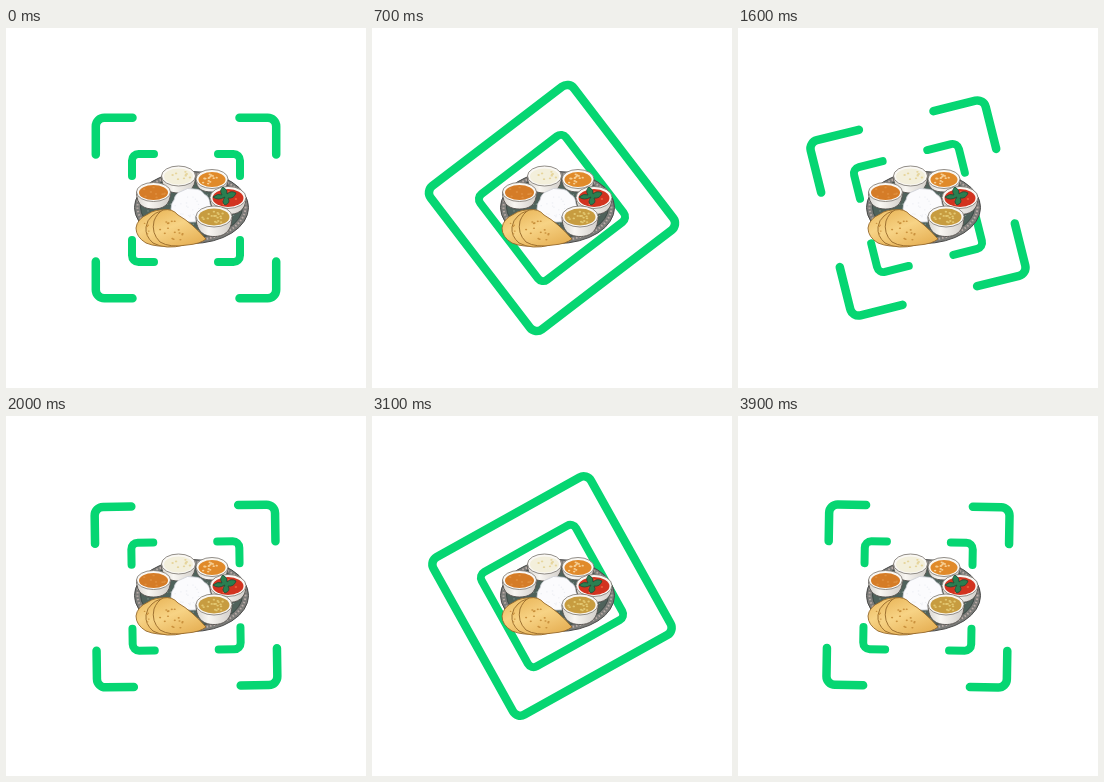
An HTML page for the animation above (4 s loop, 360x360 px).

```html
<!DOCTYPE html>
<html lang="en">
<head>
<meta charset="utf-8">
<title>Meal scan</title>
<style>
  html, body { margin: 0; width: 100%; height: 100%; overflow: hidden; background: #fff; }
  svg { display: block; width: 100vw; height: 100vh; }
</style>
</head>
<body>
<svg viewBox="0 0 360 360">
  <defs>
    <linearGradient id="crust" x1="0" y1="0" x2=".6" y2="1">
      <stop offset="0" stop-color="#e9b558"/>
      <stop offset=".5" stop-color="#f7d385"/>
      <stop offset="1" stop-color="#e8b45a"/>
    </linearGradient>
    <linearGradient id="china">
      <stop offset="0" stop-color="#d9d6d0"/>
      <stop offset=".35" stop-color="#f8f6f2"/>
      <stop offset="1" stop-color="#d2cec9"/>
    </linearGradient>
  </defs>
  <g id="frame" fill="none" stroke="#06d672" stroke-linecap="round" stroke-linejoin="round">
    <path id="outer" stroke-width="8.500"/>
    <path id="inner" stroke-width="8"/>
  </g>
  <g id="meal" stroke-linejoin="round">
    <ellipse cx="185.500" cy="179.500" rx="57" ry="36" fill="#7b7c79" stroke="#4a4a49"/>
    <ellipse cx="185.500" cy="179" rx="54" ry="33" fill="none" stroke="#b9aaa6" stroke-width="2" stroke-dasharray="1.500 2"/>
    <ellipse cx="185.500" cy="179" rx="51" ry="30.500" fill="#4f625b" stroke="#3e4a46"/>
    <g id="weave" fill="#82918a"></g>
    <g id="back"></g>
    <path d="M165 181Q165 175 168 172Q169 165 176 163Q181 159 188 161Q195 161 198 166Q204 169 204 176Q208 182 203 187Q196 195 184 194Q171 193 166 187Z" fill="#fbfbfd" stroke="#c9ccd2" stroke-width=".8"/>
    <g id="grain" fill="#eceef3"></g>
    <g id="front"></g>
    <g fill="url(#crust)" stroke="#96682a" stroke-width=".9">
      <path d="M142 186Q149 181 161 182L166 217Q152 220 140 215Q130 209 130 200Q131 191 142 186Z"/>
      <path d="M146 188Q153 181 163 184L178 217Q160 222 147 215Q139 208 140 199Q141 192 146 188Z"/>
      <path d="M157 182Q166 180 172 187Q186 195 200 211Q194 216 181 217Q164 220 154 214Q145 205 148 193Q151 185 157 182Z"/>
    </g>
    <g id="toast" fill="#c9903c"></g>
  </g>
</svg>
<script>
const LOOP = 4000, STEP = 100;
const el = id => document.getElementById(id);

// time, angle in degrees, slope in degrees per 100 ms
const KEYS = [
  [0, 0, 0], [700, 52.6, 13.2], [1200, 122, 13.6], [1940, 180, 0],
  [2000, 179.2, -2.6], [2500, 133.2, -12], [3100, 60.9, -11.5],
  [3600, 13.6, -6.3], [4000, 0, 0]
];

function angleAt(t) {
  const i = KEYS.findIndex(k => k[0] > t);
  const [t0, a, m] = KEYS[i - 1], [t1, b, n] = KEYS[i];
  const u = (t - t0) / (t1 - t0), h = (t1 - t0) / 100, v = 1 - u;
  return a * v * v * (1 + 2 * u) + b * u * u * (3 - 2 * u)
    + h * u * v * (m * v - n * u);
}

// Rounded square made of four corners; gap is half the opening of a side.
function corners(half, r, gap) {
  const e = half - r;
  return [[-1, -1], [1, -1], [1, 1], [-1, 1]].map(([x, y]) =>
    `M${x * half} ${y * gap}V${y * e}` +
    `A${r} ${r} 0 0 ${x * y > 0 ? 1 : 0} ${x * e} ${y * half}H${x * gap}`
  ).join("");
}

function seeded(n) {
  return () => (n = (n * 16807) % 2147483647) / 2147483647;
}

function dots(count, cx, cy, rx, ry, size, seed) {
  const rnd = seeded(seed);
  let s = "";
  for (let i = 0; i < count; i++) {
    const a = rnd() * Math.PI * 2, d = Math.sqrt(rnd());
    const x = cx + Math.cos(a) * d * rx, y = cy + Math.sin(a) * d * ry;
    s += `<ellipse cx="${x.toFixed(1)}" cy="${y.toFixed(1)}" rx="${size}" ry="${size * 0.75}"/>`;
  }
  return s;
}

function bowl(x, y, rx, ry, depth, fill, speck, count) {
  const w = rx - 2.5, h = ry - 2;
  return `<path d="M${x - rx} ${y}C${x - rx} ${y + depth * 0.8} ${x - 9} ${y + depth} ${x} ${y + depth}` +
    `S${x + rx} ${y + depth * 0.8} ${x + rx} ${y}Z" fill="url(#china)" stroke="#55514d" stroke-width=".9"/>` +
    `<ellipse cx="${x}" cy="${y}" rx="${rx}" ry="${ry}" fill="#faf8f4" stroke="#77716b" stroke-width=".8"/>` +
    `<ellipse cx="${x}" cy="${y + 0.5}" rx="${w}" ry="${h}" fill="${fill}"/>` +
    `<g fill="${speck}">${dots(count, x, y + 0.5, w - 2.5, h - 2, 1.2, Math.round(x * 7919))}</g>`;
}

el("weave").innerHTML = dots(150, 185.5, 179, 49, 29, 0.8, 6151);

el("back").innerHTML =
  bowl(172.5, 148, 17, 10, 17, "#f3efdb", "#e6d59c", 9) +
  bowl(206, 151, 16, 9.5, 13, "#e08a2a", "#f6cf94", 14) +
  bowl(147.5, 164, 17, 9.5, 17, "#d57c27", "#de8d3c", 9);

el("front").innerHTML =
  bowl(222, 169.5, 18, 11, 17, "#d2331f", "#e85f3c", 8) +
  `<path d="M219 169Q212 173 207 169Q212 165 216 167Q213 162 217 159Q222 162 221 166Q225 162 230 165Q228 171 222 170Q225 175 219 177Q215 174 219 169Z" fill="#2a7f50" stroke="#1d4d38" stroke-width=".8"/>` +
  bowl(208, 188.5, 18, 10.5, 20, "#c79c40", "#e3c872", 18);

el("grain").innerHTML = dots(26, 185, 179, 16, 12, 0.8, 4211);
el("toast").innerHTML = dots(16, 168, 203, 15, 11, 1.1, 9337) + dots(5, 139, 203, 5, 8, 0.9, 377);

function draw(t) {
  const a = angleAt(t);
  const off = Math.min(1, Math.min(a, 180 - a) / 40);
  const open = 1 - off * off * (3 - 2 * off);
  el("outer").setAttribute("d", corners(90.2, 8.5, 53.5 * open));
  el("inner").setAttribute("d", corners(54, 6.5, 32 * open));
  el("frame").setAttribute("transform", `translate(180 180) rotate(${a.toFixed(2)})`);
}

const start = performance.now();
function tick() {
  const t = (performance.now() - start) % LOOP;
  draw(Math.floor(t / STEP) * STEP);
  requestAnimationFrame(tick);
}
tick();
</script>
</body>
</html>
```
